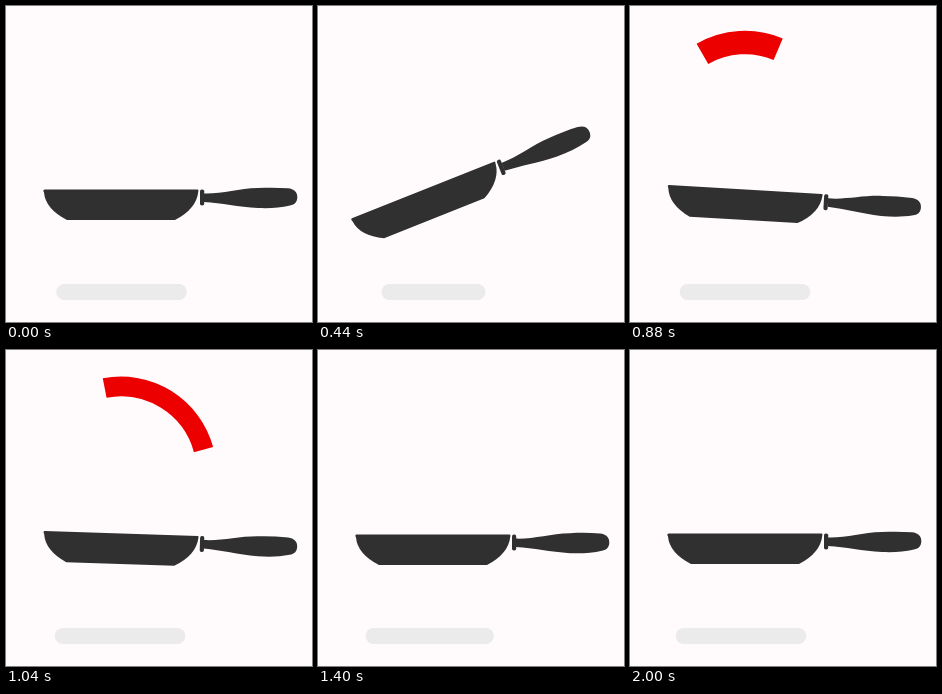
An HTML page for the animation above (2280 ms loop, 306 px wide and 316 px high).

```html
<!DOCTYPE html>
<html lang="en">
<head>
<meta charset="utf-8">
<title>Pancake flip</title>
<style>
html, body { margin: 0; width: 100%; height: 100%; overflow: hidden; background: #fffbfc; }
svg { display: block; width: 306px; height: 316px; }
</style>
</head>
<body>
<svg viewBox="0 0 306 316">
  <rect id="shadow" y="278" height="16" rx="8" fill="#ebebeb"/>
  <path id="cake" fill="none" stroke="#ec0000"/>
  <g id="pan" fill="#303030">
    <path d="M38.500 183.500H191.500Q193 183.500 192.300 185.500Q190.500 203 169 214H61Q39.500 203 38 186.500Q36.500 184 38.500 183.500Z"/>
    <rect x="194" y="183.500" width="4.200" height="16" rx="1.800"/>
    <path d="M198 187.500C216 188 232 182.500 252 182C262 181.500 272 181.500 282 182.300C288 183 291.300 186 291.300 191C291.300 196 289 198.500 284 199.500C274 201.800 264 202.500 252 202C232 201 216 197 198 196Z"/>
  </g>
</svg>
<script>
const LOOP = 2280, STEP = 40, MOVE_END = 2000, APEX = 900;
const CX = 115, CY = 122, R = 85.5, HIDDEN = 160;
const [shadow, cake, pan] = ['shadow', 'cake', 'pan'].map(id => document.getElementById(id));

const clamp = (v, lo, hi) => Math.max(lo, Math.min(hi, v));
const progress = (t, from, to) => clamp((t - from) / (to - from), 0, 1);
const ease = (t, from, to) => {
  const u = progress(t, from, to);
  return u * u * (3 - 2 * u);
};
const bump = (t, from, peak, to) => ease(t, from, peak) - ease(t, peak, to);

function drawPan(t) {
  const recoil = 6.5 * ease(t, 400, 640) * (1 - progress(t, 640, 1480)) ** 2;
  const tilt = recoil - 24 * bump(t, 0, 400, 640);
  const slide = -8 * bump(t, 0, 400, 720);
  const dip = 4 * bump(t, 1280, 1640, 2000);
  pan.setAttribute('transform', `translate(${slide} ${dip}) rotate(${tilt} ${CX} 190)`);
}

function drawShadow(t) {
  const width = 130.5 - 27 * bump(t, 0, 420, 660) - 8.5 * bump(t, 1280, 1640, 2000);
  const middle = 115.5 - 4.5 * ease(t, 680, 1640);
  shadow.setAttribute('x', middle - width / 2);
  shadow.setAttribute('width', width);
}

// Point on the flight circle, in degrees clockwise from the top.
function point(deg) {
  const a = clamp(deg, -HIDDEN, HIDDEN) * Math.PI / 180;
  return `${CX + R * Math.sin(a)} ${CY - R * Math.cos(a)}`;
}

// Slowest, shortest and thickest at the apex; rise and fall mirror each other.
function drawCake(t) {
  const u = t - APEX;
  const middle = u * (0.1725 + 0.1045 * Math.abs(u / 220) ** 1.4);
  const half = 36.3 - 10.5 * Math.cos(2 * Math.PI * u / 390);
  cake.setAttribute('d', `M${point(middle - half)}A${R} ${R} 0 0 1 ${point(middle + half)}`);
  cake.setAttribute('stroke-width', 15.5 + 8 * Math.exp(-((u / 180) ** 2)));
}

const start = performance.now();
function tick() {
  const now = (performance.now() - start) % LOOP;
  const t = Math.min(MOVE_END, Math.floor(now / STEP) * STEP);
  drawPan(t);
  drawShadow(t);
  drawCake(t);
  requestAnimationFrame(tick);
}
tick();
</script>
</body>
</html>
```
